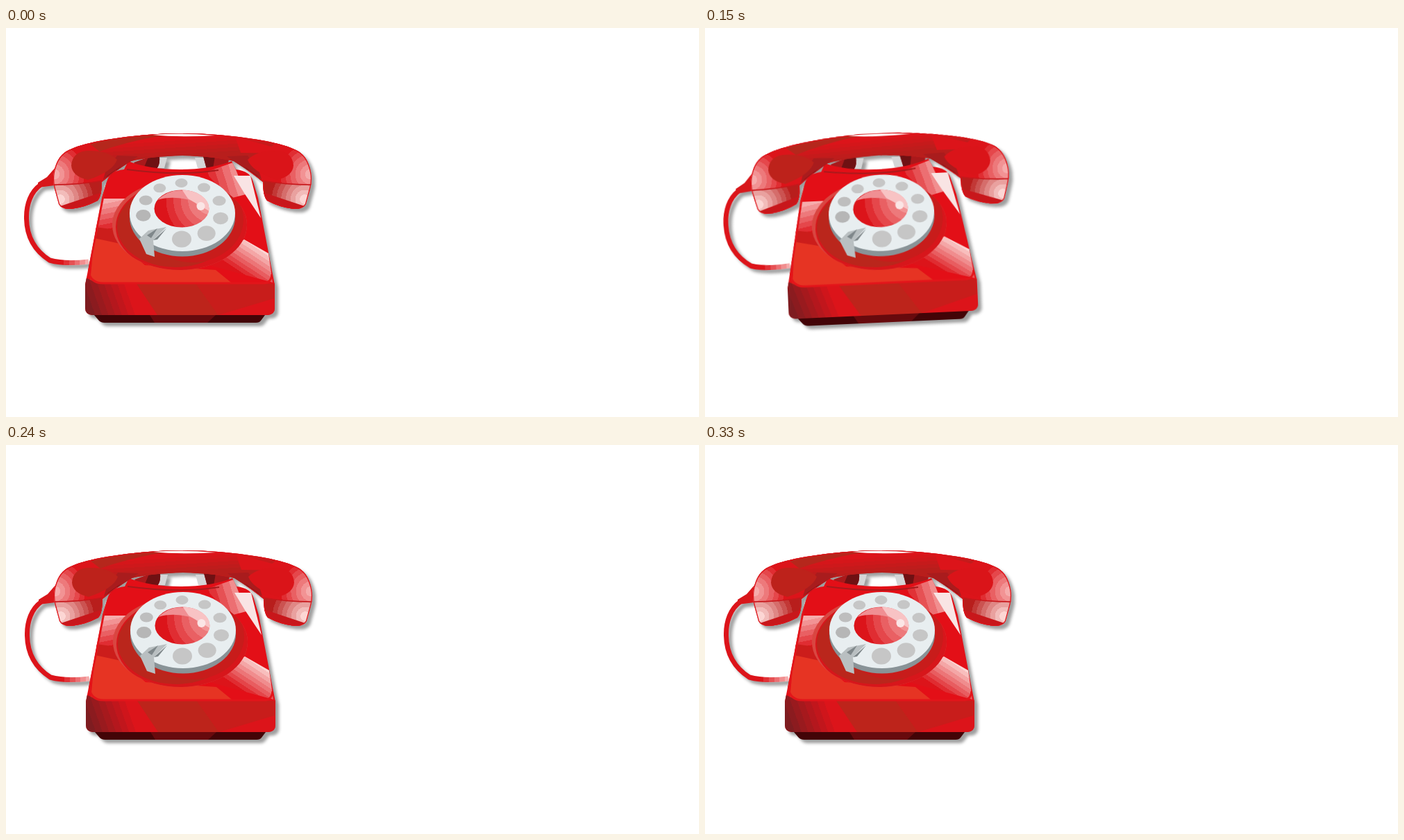
An HTML page that plays this animation: 998 px wide and 561 px high, repeating every 360 ms.

```html
<!DOCTYPE html>
<html lang="en">
<head>
<meta charset="utf-8">
<title>Ringing telephone</title>
<style>
html, body { margin: 0; width: 100%; height: 100%; overflow: hidden; background: #fff; }
svg { display: block; width: 100vw; height: 100vh; }
#phone { filter: drop-shadow(5px 5px 2px rgba(0, 0, 0, .38)); }
</style>
</head>
<body>
<svg viewBox="0 0 998 561">
<defs id="defs">
  <!-- left halves; the right ones are mirrored -->
  <path id="bodyHalf" d="M251 204Q206 204 176 192L170 204Q149 206 145 222L138 245L118 350L114 370V404Q114 413 124 414H251Z"/>
  <path id="setHalf" d="M254.500 152Q200 152 145 161Q110 167 95 174Q78 180 72 197Q65 215 70 232L76 254Q80 262 94 261Q116 258 132 249Q138 242 138 222Q156 207 180 192Q210 185 254.500 184Z"/>
  <clipPath id="bodyClip"><use href="#bodyHalf"/><use href="#bodyHalf" transform="matrix(-1 0 0 1 501 0)"/></clipPath>
  <clipPath id="setClip"><use href="#setHalf"/><use href="#setHalf" transform="matrix(-1 0 0 1 508 0)"/></clipPath>
  <clipPath id="wellClip"><ellipse cx="250" cy="284" rx="97" ry="65"/></clipPath>
  <clipPath id="knobClip"><ellipse cx="253" cy="260.500" rx="39.500" ry="27"/></clipPath>
</defs>
<g id="phone">
  <!-- cord -->
  <path d="M50 226C36 236 29 254 29.500 275C30 301 41 321 63 335Q85 341 119 337" fill="none" stroke="url(#cord)" stroke-width="7"/>
  <path d="M72 200L59 215L46 223V230L70 227Z" fill="#d8171b"/>

  <!-- cradle -->
  <path d="M219 187H232L228 202H212Z M272 187H286L290 202H276Z" fill="#d5d6d7"/>
  <path d="M184 194L206 186H221Q222 197 217 203H190Z M284 185H322L318 204H289Z" fill="#a9191b"/>
  <path d="M205 186H221Q222 197 217 203H198Z M284 185H301L298 203H289Z" fill="#6f1113"/>

  <!-- body -->
  <g clip-path="url(#bodyClip)">
    <rect x="110" y="190" width="280" height="226" fill="#e30f17"/>
    <path d="M287 208L327 194L345 240L322 246Z" fill="url(#shoulder)"/>
    <path d="M328 213L352 213L367 274L343 238Z" fill="#f9e4e4"/>
    <path d="M174 204Q250 214 306 205" fill="none" stroke="#a81a1c" stroke-width="2"/>
    <path d="M138 246H186L150 300L127 292Z" fill="url(#leftShine)"/>
    <path d="M129 287L158 291L190 337L128 305Z" fill="#cc1d1b"/>
    <path d="M127 303L164 311L200 342L302 349L324 367H121Z" fill="#e63423"/>
    <path d="M343 305L378 325L384 367L278 338Z" fill="url(#rightShine)"/>
    <path d="M110 358L132 368H390V420H110Z" fill="url(#front)"/>
    <path d="M188 369H274L306 414H218Z" fill="#bd241b"/>
    <path d="M274 369H386V390L306 414Z" fill="#c81d1b"/>
    <path d="M144 222L119 350Q121 368 140 368H372Q382 367 383 355" fill="none" stroke="#e3151a" stroke-width="3"/>
  </g>
  <path d="M127 414H373L367 422Q365 425 360 425H142Q136 425 133 421Z" fill="#430407"/>
  <path d="M207 414H302L290 425H214Z" fill="#680a0d"/>

  <!-- dial -->
  <g clip-path="url(#wellClip)">
    <rect x="150" y="215" width="200" height="140" fill="#d94641"/>
    <ellipse cx="254" cy="287" rx="96" ry="66" fill="#d7161b"/>
    <ellipse cx="244" cy="286" rx="84" ry="59" fill="#ba261c"/>
    <ellipse cx="268" cy="276" rx="74" ry="62" fill="#c81c1b"/>
  </g>
  <ellipse cx="254" cy="273" rx="76" ry="56.500" fill="#899397"/>
  <ellipse cx="254" cy="267" rx="76" ry="55" fill="#e8eef0"/>
  <g id="holes"></g>
  <g clip-path="url(#knobClip)">
    <rect x="210" y="230" width="90" height="60" fill="url(#knob)"/>
    <path d="M218 248Q254 216 294 259Q250 238 218 248Z" fill="#f08f93"/>
    <path d="M252 231L262 246L296 266V231Z" fill="#f8c3c4"/>
  </g>
  <circle cx="280.500" cy="257" r="6" fill="#fbe5e5"/>
  <path d="M192 304L205 292L231 287L212 306L214 330L202 326Z" fill="#b9bfc1"/>
  <path d="M203 299L218 289L209 303Z M212 306L231 289L218 305Z" fill="#7f878a"/>

  <!-- handset -->
  <g clip-path="url(#setClip)">
    <rect x="60" y="150" width="390" height="115" fill="#dc141a"/>
    <rect x="120" y="150" width="270" height="58" fill="url(#handle)"/>
    <path d="M108 172Q170 150 250 152Q190 158 126 181Z" fill="#b5271c"/>
    <path d="M330 157L420 181L338 180Z" fill="#dc141a"/>
    <g id="ears"></g>
  </g>
  <path d="M211 154Q254 151 301 155Q249 158 211 154Z" fill="#fff"/>
</g>
</svg>
<script>
const SVG = "http://www.w3.org/2000/svg";
const make = (parent, tag, attrs) => {
  const el = document.createElementNS(SVG, tag);
  for (const k in attrs) el.setAttribute(k, attrs[k]);
  return parent.appendChild(el);
};
const byId = id => document.getElementById(id);
const mix = (a, b, t) => `rgb(${a.map((v, i) => Math.round(v + (b[i] - v) * t))})`;

// Gradient made of n flat colour bands: a circle (3 values) or a line (4)
function bands(id, shape, from, to, n) {
  const round = shape.length === 3;
  const keys = round ? ["cx", "cy", "r"] : ["x1", "y1", "x2", "y2"];
  const attrs = { id, gradientUnits: "userSpaceOnUse" };
  keys.forEach((k, i) => attrs[k] = shape[i]);
  const g = make(byId("defs"), round ? "radialGradient" : "linearGradient", attrs);
  for (let i = 0; i < n; i++) {
    const color = mix(from, to, i / (n - 1));
    for (const edge of [i, i + 1]) make(g, "stop", { offset: edge / n, "stop-color": color });
  }
}
const red = [220, 20, 26], pink = [246, 172, 172], pale = [252, 214, 212];
const dark = [184, 30, 28], wine = [126, 28, 32];
bands("cord", [75, 300, 122, 300], red, pink, 6);
bands("shoulder", [285, 225, 345, 206], red, pink, 6);
bands("leftShine", [142, 246, 152, 296], pink, red, 7);
bands("rightShine", [363, 312, 334, 356], pale, red, 9);
bands("front", [114, 400, 182, 376], wine, red, 8);
bands("knob", [294, 248, 74], pink, red, 7);
bands("handle", [250, 157, 252, 187], red, dark, 6);
bands("ear", [70, 211, 50], pink, red, 7);
bands("cup", [78, 247, 54], pale, dark, 8);

// Finger holes run round an ellipse and grow towards the front
for (let i = 0; i < 9; i++) {
  const a = (171 + 31 * i + i * i / 2) * Math.PI / 180;
  const near = ((1 + Math.sin(a)) / 2) ** 2;
  const shade = 182 + 16 * Math.min(i / 2, 1);
  make(byId("holes"), "ellipse", {
    cx: 254 + 57 * Math.cos(a), cy: 264 + 40.5 * Math.sin(a),
    rx: 9 + 5 * near, ry: 6.5 + 5.5 * near, fill: `rgb(${shade},${shade},${shade})`
  });
}

function ear(side, pad) {
  const g = make(byId("ears"), "g", side < 0 ? {} : { transform: "matrix(-1 0 0 1 508 0)" });
  const fill = (d, color) => make(g, "path", { d, fill: color });
  fill("M66 165H118L150 190L140 224L68 228Z", "url(#ear)");
  fill("M160 184L190 185L139 222L143 208Z", "#a91c1d");
  fill("M146 213L166 199L137 224Z", "#7b1517");
  fill("M94 198Q96 177 120 177Q147 177 160 190Q154 207 118 219Q95 214 94 198Z", pad);
  fill("M66 227Q104 225 140 220L138 246L86 264H74Z", "url(#cup)");
  fill("M78 257L138 237L134 250L94 264Z", "#c8171b");
  make(g, "path", { d: "M69 226Q108 226 139 220", fill: "none", stroke: "#c7171b", "stroke-width": 1.3 });
  make(g, "use", { href: "#setHalf", fill: "none", stroke: "#dc141a", "stroke-width": 2.5, "stroke-dasharray": "370 900" });
}
ear(-1, "#bd221b");
ear(1, "#da1419");

// The phone rests, rocks to and fro in 30 ms steps, and rests again
const STEP = 30, COUNT = 12;
function tilt(i) {
  if (i < 3 || i > 10) return 0;
  const a = (i - 2) * Math.PI / 2;
  return 2.6 * Math.sin(a) - Math.max(0, Math.cos(a));
}
const phone = byId("phone");
function draw(ms) {
  const i = Math.floor(ms / STEP) % COUNT;
  phone.setAttribute("transform", `translate(${i > 2 ? 1 : 0} 0) rotate(${tilt(i)} 245 287)`);
}
const start = performance.now();
function tick() {
  draw(performance.now() - start);
  requestAnimationFrame(tick);
}
draw(0);
requestAnimationFrame(tick);
</script>
</body>
</html>
```
